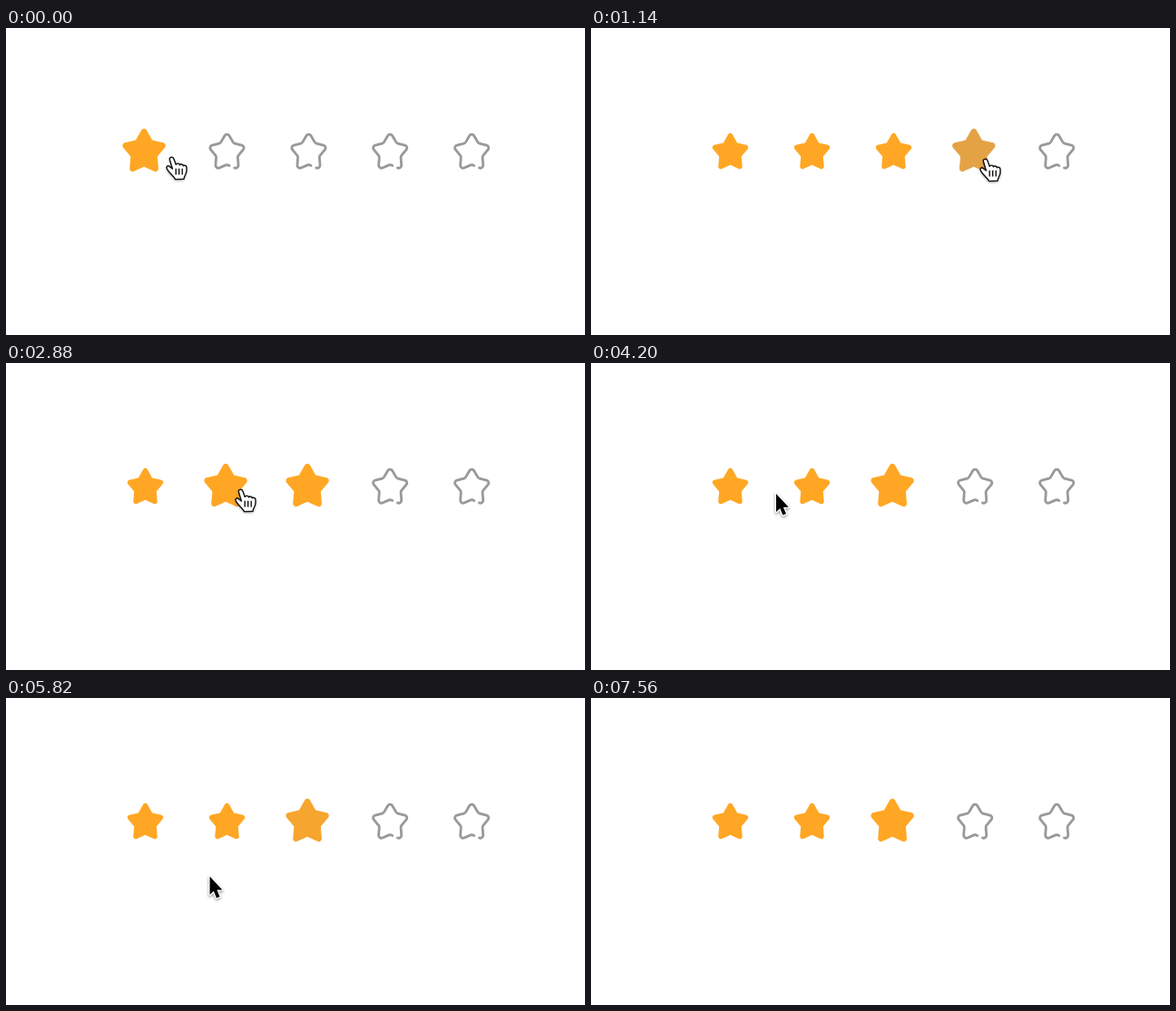
Write an HTML page with a canvas that moves like this. It is 638 by 338 pixels and loops after 7620 ms.

```html
<!DOCTYPE html>
<html lang="en">
<head>
<meta charset="utf-8">
<title>Star rating</title>
<style>
html, body { margin: 0; width: 100%; height: 100%; overflow: hidden; background: #fff; }
canvas { display: block; }
</style>
</head>
<body>
<canvas id="stage" width="638" height="338"></canvas>
<script>
const ctx = document.getElementById('stage').getContext('2d');
const LOOP = 7620, TICK = 60, STEP = 10;
const RATING = 2, HIT = 34;
const HOLD = 90, FILL_MS = 220, GROW_MS = 60;
const GREY = [153, 153, 156], ORANGE = [255, 167, 36];
const centers = [153.5, 243.5, 333.5, 423.2, 513.2];

// Pointer route: time, x, y
const route = [
  [0, 182, 144], [60, 184, 144], [420, 255, 146], [780, 333, 146],
  [1140, 434, 146], [1440, 508, 148], [1620, 517, 148], [1740, 512, 148],
  [2040, 360, 147], [2340, 338, 148], [2640, 336, 146], [2880, 258, 141],
  [3120, 236, 143], [3500, 215, 142], [3700, 205, 142], [4200, 204, 143],
  [4380, 178, 146], [4560, 162, 148], [4740, 172, 149], [5000, 225, 149],
  [5220, 268, 148], [5460, 262, 150], [5520, 256, 157], [5940, 212, 211],
  [6240, 212, 211], [6660, 200, 203], [6960, 290, 288], [7260, 365, 345],
  [LOOP, 365, 380]
];

const clamp = v => Math.max(0, Math.min(1, v));
const mix = (a, b, p) => a + (b - a) * p;

function pointer(t) {
  let i = 1;
  while (i < route.length - 1 && route[i][0] < t) i++;
  const [t0, x0, y0] = route[i - 1], [t1, x1, y1] = route[i];
  const p = clamp((t - t0) / (t1 - t0));
  return { x: mix(x0, x1, p), y: mix(y0, y1, p) };
}

function hovered({ x, y }) {
  return Math.abs(y - 137) > HIT ? -1 : centers.findIndex(c => Math.abs(x - c) < HIT);
}

// Rises at once; falls only after a short hold
function approach(v, on, duration) {
  v.wait = on ? 0 : v.wait + STEP;
  if (on) v.value = clamp(v.value + STEP / duration);
  else if (v.wait > HOLD) v.value = clamp(v.value - STEP / duration);
}

function simulate() {
  const stars = centers.map((_, i) => ({
    fill: { value: +(i === 0), wait: 0 },
    size: { value: +(i === 0), wait: 0 }
  }));
  const frames = [];
  for (let t = 0; t < LOOP; t += STEP) {
    const hover = hovered(pointer(t));
    const active = hover < 0 ? RATING : hover;
    stars.forEach((s, i) => {
      approach(s.fill, i <= active, FILL_MS);
      approach(s.size, i === active, GROW_MS);
    });
    if (t % TICK === 0) frames.push(stars.map(s => [s.fill.value, s.size.value]));
  }
  return frames;
}
const frames = simulate();

function starPath(outer, inner, round, open) {
  const at = k => {
    const r = k % 2 ? inner : outer, a = k * Math.PI / 5;
    return [r * Math.sin(a), -r * Math.cos(a) * 1.05];
  };
  const between = (k, p) => at(k).map((v, i) => mix(v, at(k + 1)[i], p));
  // Runs anticlockwise from the lower right foot to the bottom notch
  ctx.beginPath();
  ctx.moveTo(...between(4, open ? 0.36 : 0.5));
  for (let k = 14; k > 4; k--) ctx.arcTo(...at(k), ...at(k - 1), round);
  if (open) ctx.lineTo(...between(4, 0.8));
  else ctx.closePath();
}

function drawStar(x, fill, size) {
  const scale = mix(1, 1.2, size);
  ctx.save();
  ctx.translate(x - 1.4 * size, 137.3 - 0.7 * size);
  ctx.scale(scale, scale);
  ctx.lineWidth = 2.8;
  ctx.lineCap = ctx.lineJoin = 'round';
  const color = `rgb(${GREY.map((g, i) => Math.round(mix(g, ORANGE[i], fill)))})`;
  ctx.fillStyle = ctx.strokeStyle = color;
  if (fill > 0) {
    ctx.globalAlpha = clamp(fill * 2);
    starPath(20.5, 11.4, 1.4, false);
    ctx.fill();
    ctx.stroke();
  }
  if (fill < 0.5) {
    ctx.globalAlpha = 1 - fill * 2;
    starPath(22, 12.4, 3, true);
    ctx.stroke();
  }
  ctx.restore();
}

const handShape = new Path2D(
  'M-1.7 .8C-2-2 1.8-2.6 2.9 0L5.3 6.4C6 4.6 8.8 4.8 9.4 6.8C10.2 5.4 12.9 5.8 13.4 7.8' +
  'C14.4 6.8 17 7.4 17 9.6L17 13C17 17 14.6 18 14 22.2L4.6 22.6' +
  'C3 19-1 17-4 12.2C-6.4 8.8-4 6.8-1.6 8.6L1.4 11Z');
const handLines = new Path2D('M5.2 10.8V17.6M8.7 10.8V17.6M12.2 10.8V17.6');
const arrowShape = new Path2D('M0 1V21L4.3 17L7.4 24.6L11 23.1L7.9 15.7H13.8Z');

function shadow(on) {
  ctx.shadowColor = on ? 'rgba(0,0,0,.4)' : 'transparent';
  ctx.shadowBlur = on ? 3 : 0;
  ctx.shadowOffsetY = on ? 1.5 : 0;
}

function drawPointer(p) {
  ctx.save();
  ctx.translate(p.x, p.y);
  ctx.lineJoin = 'round';
  if (hovered(p) >= 0) {
    shadow(true);
    ctx.fillStyle = '#fff';
    ctx.fill(handShape);
    shadow(false);
    ctx.strokeStyle = '#111';
    ctx.lineWidth = 1.4;
    ctx.stroke(handShape);
    ctx.stroke(handLines);
  } else {
    shadow(true);
    ctx.strokeStyle = '#fff';
    ctx.lineWidth = 2.6;
    ctx.stroke(arrowShape);
    shadow(false);
    ctx.fillStyle = '#000';
    ctx.fill(arrowShape);
  }
  ctx.restore();
}

function render(now) {
  const n = Math.floor((now % LOOP) / TICK);
  ctx.fillStyle = '#fff';
  ctx.fillRect(0, 0, 638, 338);
  frames[n].forEach(([fill, size], i) => drawStar(centers[i], fill, size));
  drawPointer(pointer(n * TICK));
}

const start = performance.now();
function loop() {
  render(performance.now() - start);
  requestAnimationFrame(loop);
}
loop();
</script>
</body>
</html>
```
